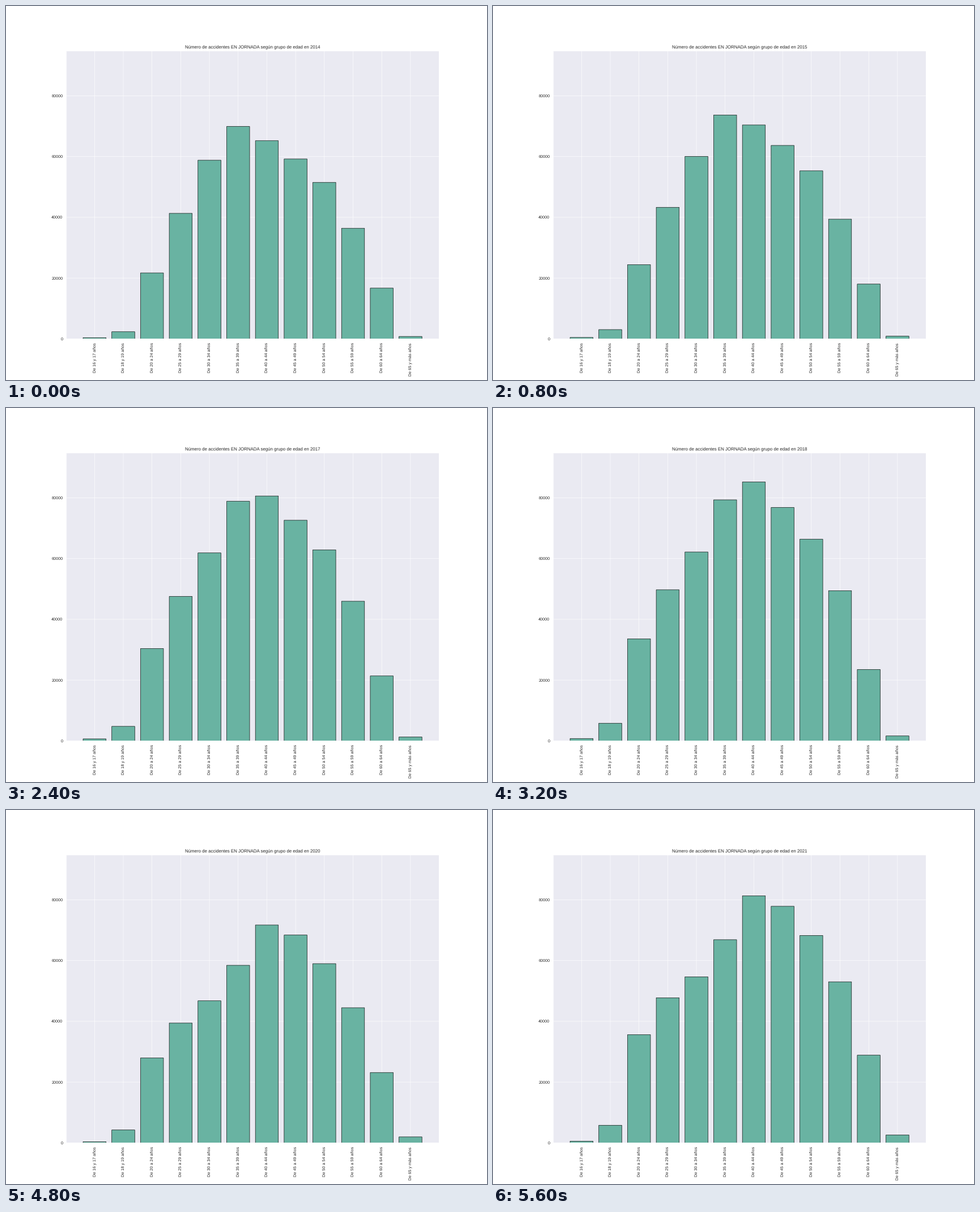
A matplotlib script for the animation above (6.4 s loop, 849 px wide and 660 px high).

```python
import matplotlib.pyplot as plt
import numpy as np
from matplotlib.animation import FuncAnimation

W, H, DPI = 849, 660, 48
UNIT = W / 18 / DPI  # scale of one point on an 18 inch wide sheet
INK = "#262626"
PANEL = "#eaeaf2"
TEAL = "#69b3a2"

plt.rcParams.update({
    "font.family": "Liberation Sans",
    "text.hinting": "none",
    "text.color": INK,
})

AGES = ["16 y 17", "18 y 19"]
AGES += [f"{a} a {a + 4}" for a in range(20, 65, 5)] + ["65 y más"]
SLOTS = np.arange(len(AGES))

# Thousands of accidents per age group in the years where the trend turns
KEYS = {
    2014: [.4, 2.35, 21.7, 41.3, 58.8, 69.9, 65.2, 59.2, 51.5, 36.4, 16.7, .8],
    2016: [.55, 3.95, 27.85, 45.8, 61.6, 78.45, 76.95, 69.3, 60.1, 43.2, 19.7, 1],
    2019: [.92, 6.95, 37.1, 52.1, 62.5, 79.85, 90.25, 81.4, 70.2, 53.25, 25.8, 2],
    2021: [.57, 5.8, 35.6, 47.75, 54.65, 66.85, 81.3, 77.85, 68.25, 53, 28.85, 2.6],
}
TURNS = {year: 1000 * np.array(row) for year, row in KEYS.items()}
YEARS = range(min(TURNS), max(TURNS) + 1)


def counts(year):
    if year == 2020:  # the dip spares the middle ages most
        return TURNS[2021] * (0.882 - 0.0055 * (SLOTS - 6.2) ** 2)
    start = max(y for y in TURNS if y <= year)
    end = min(y for y in TURNS if y >= year)
    t = ((year - start) / max(end - start, 1)) ** 1.18
    return TURNS[start] + (TURNS[end] - TURNS[start]) * t


fig = plt.figure(figsize=(W / DPI, H / DPI), dpi=DPI, facecolor="white")
ax = fig.add_axes([0.125, 0.11, 0.775, 0.77], facecolor=PANEL)

bars = ax.bar(SLOTS, counts(YEARS[0]), color=TEAL,
              edgecolor="black", linewidth=UNIT, snap=False)
title = ax.set_title("", fontsize=12 * UNIT, pad=6 * UNIT)

ax.set_xlim(-0.99, 11.99)
ax.set_ylim(0, 1.05 * max(row.max() for row in TURNS.values()))
ax.set_xticks(SLOTS, [f"De {a} años" for a in AGES], rotation=90)
ax.set_yticks(range(0, 80001, 20000))
ax.set_axisbelow(True)
ax.grid(color="white", linewidth=UNIT, snap=False)
ax.tick_params(length=0, labelsize=11 * UNIT, labelcolor=INK)
ax.tick_params(axis="x", pad=10.5 * UNIT)
ax.tick_params(axis="y", pad=8.7 * UNIT)
for spine in ax.spines.values():
    spine.set(color="white", linewidth=1.25 * UNIT)


def draw(i):
    year = YEARS[i]
    for bar, count in zip(bars, counts(year)):
        bar.set_height(count)
    title.set_text(f"Número de accidentes EN JORNADA según grupo de edad en {year}")
    return [*bars, title]


anim = FuncAnimation(fig, draw, frames=len(YEARS), interval=800,
                     repeat=True, repeat_delay=0)
plt.show()
```
